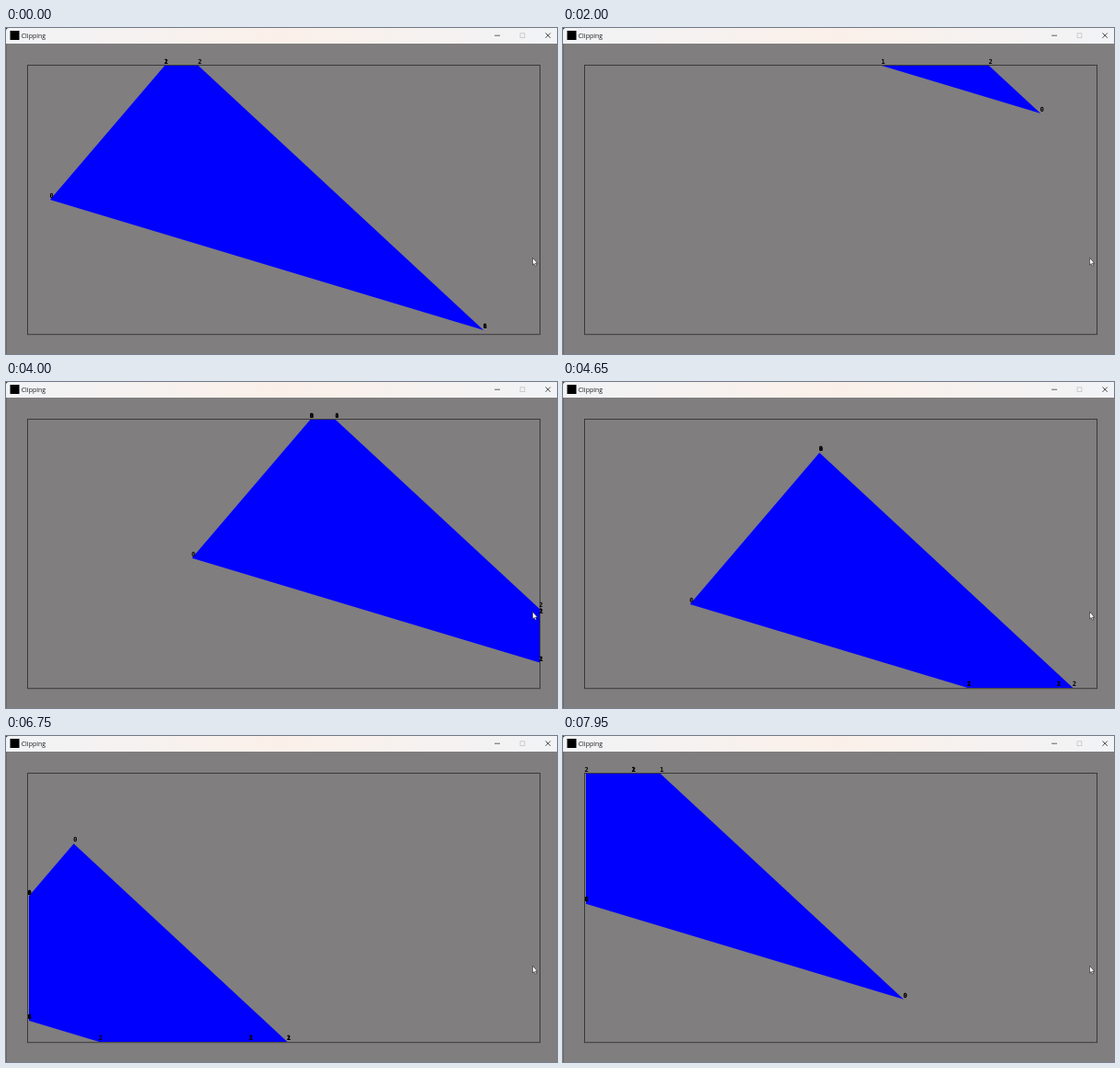
Write an HTML page with a canvas that moves like this. It is 600 px wide and 355 px high and loops after 8000 ms.

```html
<!DOCTYPE html>
<html lang="en">
<head>
<meta charset="utf-8">
<title>Clipping</title>
<style>
  html, body { margin: 0; width: 100%; height: 100%; overflow: hidden; background: #807e7f; }
  #stage { position: relative; width: 600px; height: 355px; overflow: hidden; }
  canvas, svg { position: absolute; left: 0; top: 0; display: block; }
  .title { font: 7px "Open Sans", "Noto Sans", sans-serif; fill: #1c1c1c; }
</style>
</head>
<body>
<div id="stage">
  <canvas id="view" width="600" height="355"></canvas>
  <svg width="600" height="355" viewBox="0 0 600 355">
    <defs>
      <linearGradient id="bar">
        <stop offset="0" stop-color="#f1f3f6"/>
        <stop offset=".5" stop-color="#fbf0e9"/>
        <stop offset="1" stop-color="#f1f3f6"/>
      </linearGradient>
    </defs>
    <rect width="600" height="17" fill="url(#bar)"/>
    <path d="M0 0H3Q0 0 0 3Z" fill="#222"/>
    <rect y="17" width="1" height="338" fill="#6b696a"/>
    <rect x="4.5" y="3" width="10" height="10" fill="#000"/>
    <text class="title" x="16.7" y="11">Clipping</text>
    <path d="M532 8.2H538" stroke="#222" stroke-width=".7"/>
    <rect x="560" y="5.8" width="4.8" height="4.8" fill="none" stroke="#c4c4c4" stroke-width=".8"/>
    <path d="M587.5 5.5L592.8 10.8M592.8 5.5L587.5 10.8" stroke="#222" stroke-width=".8"/>
    <path d="M573.5 250.3V258L575.2 256.5L576.4 259.2L577.6 258.6L576.5 256.1H578.6Z"
          fill="#fff" stroke="#222" stroke-width=".6"/>
  </svg>
</div>
<script>
const ctx = document.getElementById('view').getContext('2d');
const LOOP = 8000, STEP = 50;
const SPEED = 0.1437; // px per ms while a key is held
const box = { left: 24, top: 41, right: 581, bottom: 333 };

const start = { x: 48, y: 187 };
const shape = [[0, 0], [141, -165], [472, 142]];

// The triangle moves at constant speed while an arrow key is held: [from, to]
const held = {
  up: [[0, 1690], [6485, 7707]],
  down: [[1952, 2305], [2630, 4055], [4355, 4750], [5205, 5650]],
  left: [[4203, 5590], [6010, 6500], [7715, LOOP]],
  right: [[2690, 3765]]
};

// Signed distance to each clipping edge, in clipping order
const edges = [
  p => p[0] - box.left,
  p => p[1] - box.top,
  p => box.right - p[0],
  p => box.bottom - p[1]
];

function travel(key, t) {
  return SPEED * held[key].reduce(
    (sum, [from, to]) => sum + Math.max(0, Math.min(t, to) - from), 0);
}

function clipTriangle(tri, dist) {
  const inside = tri.filter(p => dist(p) >= 0);
  const outside = tri.filter(p => dist(p) < 0);
  const cut = (a, b) => {
    const k = dist(a) / (dist(a) - dist(b));
    return [a[0] + (b[0] - a[0]) * k, a[1] + (b[1] - a[1]) * k];
  };
  if (inside.length === 3) return [tri];
  if (inside.length === 0) return [];
  if (inside.length === 1) {
    const [a] = inside;
    return [[a, cut(a, outside[0]), cut(a, outside[1])]];
  }
  const [a, b] = inside, [c] = outside, ac = cut(a, c);
  return [[a, b, ac], [b, ac, cut(b, c)]];
}

function draw(t) {
  const x = start.x + travel('right', t) - travel('left', t);
  const y = start.y + travel('down', t) - travel('up', t);
  const tri = shape.map(([dx, dy]) => [x + dx, y + dy]);
  const pieces = edges.reduce(
    (list, dist) => list.flatMap(piece => clipTriangle(piece, dist)), [tri]);

  ctx.fillStyle = '#807e7f';
  ctx.fillRect(0, 0, 600, 355);
  ctx.strokeStyle = '#3a393a';
  ctx.lineWidth = 1;
  ctx.strokeRect(23.5, 40.5, 558, 293.2);

  ctx.save();
  ctx.beginPath();
  ctx.rect(box.left + 1, box.top, box.right - box.left - 1, box.bottom - box.top);
  ctx.clip();
  ctx.beginPath();
  tri.forEach(p => ctx.lineTo(...p));
  ctx.fillStyle = '#00f';
  ctx.fill();
  ctx.restore();

  ctx.fillStyle = '#000';
  ctx.font = 'bold 7px "DejaVu Sans Mono", monospace';
  pieces.forEach(piece => piece.forEach((p, i) => ctx.fillText(i, p[0] - 0.5, p[1] - 2)));
}

function tick() {
  const t = performance.now() % LOOP;
  draw(Math.floor(t / STEP) * STEP);
  requestAnimationFrame(tick);
}
tick();
</script>
</body>
</html>
```
